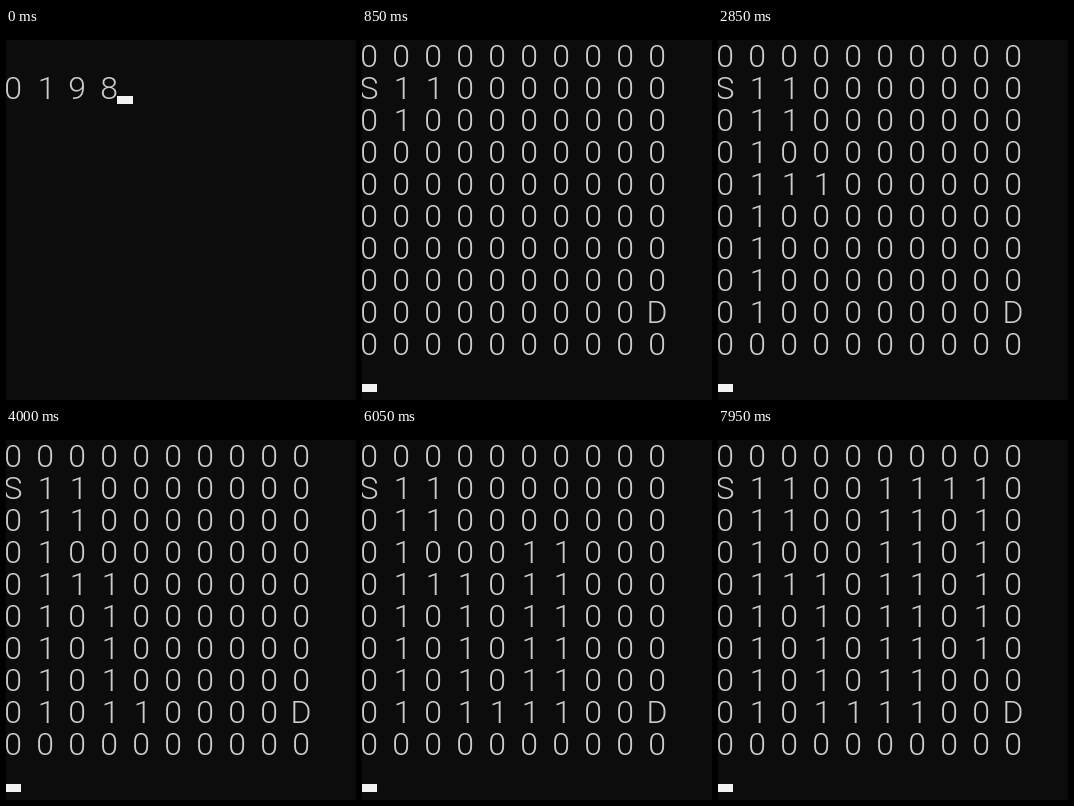
These frames come from a looping animation (350x372 px, 8 s). An HTML page:

```html
<!DOCTYPE html>
<html lang="en">
<head>
<meta charset="utf-8">
<title>Grid search console</title>
<style>
  html, body { margin: 0; width: 100%; height: 100%; overflow: hidden; background: #000; }
  svg { display: block; width: 350px; height: 372px; }
  text {
    font: 350 32px Roboto, "Liberation Sans", sans-serif;
    font-stretch: 88%;
    fill: #ccc;
    text-anchor: middle;
  }
</style>
</head>
<body>
<svg viewBox="0 0 350 372">
  <rect y="12" width="350" height="360" fill="#0c0c0c"/>
  <g id="input"></g>
  <g id="grid"></g>
  <rect id="cursor" height="8" fill="#f2f2f2"/>
</svg>
<script>
const LOOP = 8000, PRINT = 450, CLEAR = 800, SIZE = 10, STEP = 32;
const input = document.getElementById('input');
const grid = document.getElementById('grid');
const cursor = document.getElementById('cursor');

// Time in ms, then the cells (row and column digits) marked at that time
const marks = [
  [450, '11'], [550, '21'], [800, '12'], [1000, '22 31'], [1200, '41'],
  [1400, '42 51'], [1600, '61'], [1900, '71'], [2200, '81'],
  [2700, '43'], [2950, '53'], [3200, '63'], [3450, '73'], [3700, '83'],
  [3950, '84'], [4250, '85'], [4500, '75 86'], [4800, '76'],
  [5100, '65 66'], [5300, '55 56'], [5550, '45 46'], [5850, '35 36'],
  [6200, '25 26'], [6300, '15 16'], [6500, '17'], [6700, '18'],
  [6950, '28'], [7150, '38'], [7350, '48'], [7600, '58'], [7800, '68']
];
const markTime = {};
for (const [time, cells] of marks)
  for (const cell of cells.split(' ')) markTime[cell] = time;

// The digit 1 sits a little to the right in its cell
function setChar(el, col, char) {
  if (el.textContent === char) return;
  el.setAttribute('x', 7 + STEP * col + (char === '1' ? 1.5 : 0));
  el.textContent = char;
}

function addChar(parent, row, col, char) {
  const el = document.createElementNS('http://www.w3.org/2000/svg', 'text');
  el.setAttribute('y', 39 + STEP * row);
  setChar(el, col, char);
  parent.append(el);
  return el;
}

[...'0198'].forEach((char, col) => addChar(input, 1, col, char));

const cells = [];
for (let row = 0; row < SIZE; row++)
  for (let col = 0; col < SIZE; col++) {
    const key = `${row}${col}`;
    const char = key === '10' ? 'S' : key === '89' ? 'D' : '0';
    cells.push({ el: addChar(grid, row, col, char), col, char, time: markTime[key] ?? Infinity });
  }

const show = (el, on) => el.setAttribute('visibility', on ? 'visible' : 'hidden');

function placeCursor(x, y, width) {
  cursor.setAttribute('x', x);
  cursor.setAttribute('y', y);
  cursor.setAttribute('width', width);
}

function render(t) {
  const typing = t < PRINT, cleared = t >= CLEAR;
  show(input, !cleared);
  show(grid, !typing);
  show(cursor, typing || cleared);
  grid.setAttribute('transform', `translate(0 ${cleared ? 0 : 2 * STEP})`);
  if (typing) placeCursor(111, 68, 16);
  else placeCursor(0, 356, 15);
  for (const { el, col, char, time } of cells) setChar(el, col, t >= time ? '1' : char);
}

const start = performance.now();
function tick() {
  render((performance.now() - start) % LOOP);
  requestAnimationFrame(tick);
}
tick();
</script>
</body>
</html>
```
